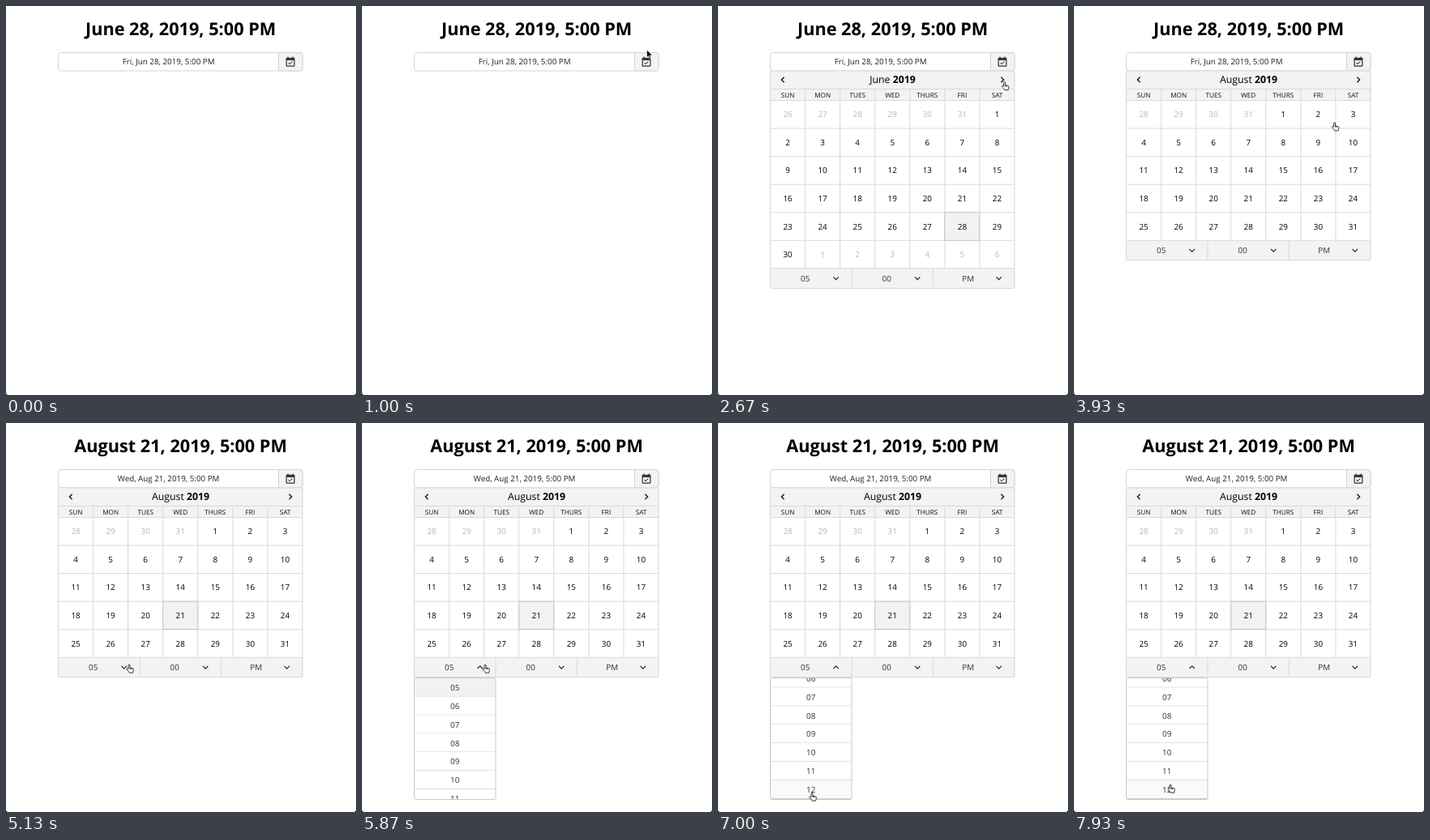
Write an HTML page that moves like this. It is 432 px wide and 480 px high and loops after 8000 ms.

```html
<!DOCTYPE html>
<html lang="en">
<head>
<meta charset="utf-8">
<title>Date picker</title>
<style>
html, body { margin: 0; width: 432px; height: 480px; overflow: hidden; background: #000; }
svg { display: block; background: #fff; border-radius: 0 0 3px 3px; font-family: "Open Sans", sans-serif; text-anchor: middle; text-rendering: geometricPrecision; }
.line { fill: none; stroke: #d9d9d9; }
.chevron { fill: none; stroke: #222; }
.option + text + .line { stroke: #c6c6c6; }
</style>
</head>
<body>
<svg id="stage" width="432" height="480" viewBox="0 0 432 480"></svg>
<script>
const LOOP = 8000, STEP = 1000 / 15;
const LEFT = 64.5, RIGHT = 366, WIDTH = RIGHT - LEFT, COL = WIDTH / 7, ROW = 34.55;
const TOP = 80, GRID_TOP = 116.5, FOOT = 24.5;
const OPTION = 22.9, LIST_TOP = 314.5, LIST_HEIGHT = 150, LIST_WIDTH = WIDTH / 3;

// Text centred on (x, y) by its cap height
const text = (x, y, content, size = 9.9, fill = '#000', extra = '') =>
  `<text x="${x}" y="${y + size * 0.357}" font-size="${size}" fill="${fill}" ${extra}>${content}</text>`;
const rect = (x, y, w, h, fill, extra = '') =>
  `<rect x="${x}" y="${y}" width="${w}" height="${h}" fill="${fill}" ${extra}/>`;
const line = d => `<path class="line" d="${d}"/>`;
const chevron = (x, y, angle, weight = 1.2) =>
  `<path class="chevron" d="M-3.2 -1.6L0 1.6L3.2 -1.6" stroke-width="${weight}" transform="translate(${x} ${y}) rotate(${angle})"/>`;

function calendar({ month, selected, open }) {
  const first = new Date(2019, month, 1);
  const offset = first.getDay();
  const days = new Date(2019, month + 1, 0).getDate();
  const rows = Math.ceil((offset + days) / 7);
  const foot = GRID_TOP + rows * ROW;
  const height = foot + FOOT - TOP;
  const name = first.toLocaleString('en', { month: 'long' });

  let out = rect(LEFT, TOP, WIDTH, height, '#f3f3f3') +
    rect(LEFT, GRID_TOP, WIDTH, rows * ROW, '#fff') +
    chevron(80, 91, 90, 1.5) + chevron(351, 91, -90, 1.5) +
    text(215.5, 91, `${name} <tspan font-weight="700">2019</tspan>`, 12.3) +
    line(`M${LEFT} 102.5H${RIGHT}`);

  ['SUN', 'MON', 'TUES', 'WED', 'THURS', 'FRI', 'SAT'].forEach((day, i) => {
    const x = LEFT + i * COL;
    out += text(x + COL / 2, 110, day, 8.2, '#111', 'font-weight="500"');
    if (i) out += line(`M${x} 102.5V${foot}`);
  });
  for (let r = 0; r <= rows; r++) out += line(`M${LEFT} ${GRID_TOP + r * ROW}h${WIDTH}`);

  for (let i = 0; i < rows * 7; i++) {
    const x = LEFT + i % 7 * COL, y = GRID_TOP + Math.floor(i / 7) * ROW;
    const day = i - offset + 1, inside = day > 0 && day <= days;
    if (inside && day === selected) out += rect(x, y, COL, ROW, '#f2f2f2', 'stroke="#c4c4c4"');
    out += text(x + COL / 2, y + ROW / 2, new Date(2019, month, day).getDate(), 9.9, inside ? '#000' : '#b8b8b8');
  }
  ['05', '00', 'PM'].forEach((label, i) => {
    const x = LEFT + i * LIST_WIDTH, y = foot + FOOT / 2;
    out += text(x + 43.2, y, label, 9.9, '#333') + chevron(x + 81.2, y, open && !i ? 180 : 0);
    if (i) out += line(`M${x} ${foot}v${FOOT}`);
  });
  return out + rect(LEFT, TOP, WIDTH, height, 'none', 'rx="2" stroke="#d5d5d5"');
}

const views = [
  { at: 1600, month: 5, selected: 28 },
  { at: 3070, month: 6 },
  { at: 3600, month: 7 },
  { at: 4670, month: 7, selected: 21 },
  { at: 5530, month: 7, selected: 21, open: true }
];
const PICKED = views[3].at, OPENED = views[4].at;
const hours = Array.from({ length: 8 }, (_, i) => String(i + 5).padStart(2, '0'));

const stage = document.getElementById('stage');
stage.innerHTML = `
  <clipPath id="listClip">${rect(LEFT, LIST_TOP, LIST_WIDTH, LIST_HEIGHT, '#fff')}</clipPath>
  ${text(215.6, 28.4, '', 21.7, '#000', 'id="heading" font-weight="700"')}
  ${rect(LEFT, 57.5, WIDTH, 22.5, '#fff', 'rx="3" stroke="#d5d5d5"')}
  <path d="M336.5 57.5H363a3 3 0 0 1 3 3V77a3 3 0 0 1-3 3H336.5Z" fill="#f3f3f5" stroke="#d5d5d5"/>
  <path fill="#333" transform="translate(343.7 62) scale(.61)" fill-rule="evenodd" d="M16.5 11L15.5 10L10.6 14.9L8.5 12.8L7.4 13.8L10.6 17ZM19 3H18V1H16V3H8V1H6V3H5a2 2 0 0 0-2 2V19a2 2 0 0 0 2 2H19a2 2 0 0 0 2-2V5a2 2 0 0 0-2-2ZM19 19H5V8H19Z"/>
  ${text(200.6, 68.8, '', 9.8, '#222', 'id="field"')}
  <g id="calendar">${views.map(v => `<g class="view">${calendar(v)}</g>`).join('')}</g>
  <g id="list">
    <g clip-path="url(#listClip)"><g id="options">
      ${hours.map((hour, i) => {
        const y = LIST_TOP + i * OPTION;
        return rect(LEFT, y, LIST_WIDTH, OPTION, '#fff', 'class="option"') +
          text(LEFT + LIST_WIDTH / 2, y + 11.8, hour, 9.9, '#333') +
          line(`M${LEFT} ${y + OPTION}h${LIST_WIDTH}`);
      }).join('')}
    </g></g>
    ${rect(LEFT, LIST_TOP, LIST_WIDTH, LIST_HEIGHT, 'none', 'rx="2" stroke="#c8c8c8"')}
  </g>
  <g id="cursor" stroke-linejoin="round">
    <path id="arrow" d="M0 0V9.6L2.2 7.6L3.7 11L5.3 10.3L3.8 7H7Z" fill="#000" stroke="#fff" stroke-width=".7"/>
    <path id="hand" transform="scale(.93)" d="M2.8 6.6V1.6a1 1 0 0 1 2 0V5l3.4.7a1.5 1.5 0 0 1 1.3 1.7c0 1.8-.6 2.4-.8 4.1H4.1C3.6 9.8 1.6 8.6.7 7.1C.1 6 1.4 5.3 2.1 6ZM5 5V7M6.7 5.4V7.2" fill="#fff" stroke="#111" stroke-width=".9"/>
  </g>`;

const part = id => document.getElementById(id);
const viewNodes = [...document.querySelectorAll('.view')];
const optionNodes = [...document.querySelectorAll('.option')];
const show = (node, on) => { node.style.display = on ? '' : 'none'; };
const clamp = v => Math.max(0, Math.min(1, v));
const ease = u => 1 - (1 - u) ** 3.5;

// Each move starts where the one before ended; bend bows it sideways
const moves = [
  { from: 135, to: 530, x: 300, y: 212.5, bend: -44 },
  { from: 735, to: 1000, x: 351.5, y: 54 },
  { from: 1135, to: 1400, x: 348.5, y: 63.5 },
  { from: 1870, to: 2400, x: 227, y: 93 },
  { from: 2400, to: 2670, x: 350, y: 93 },
  { from: 3867, to: 4400, x: 219.5, y: 228, bend: 18 },
  { from: 4800, to: 5130, x: 148.5, y: 297.5 },
  { from: 6065, to: 6267, x: 135, y: 341.5 },
  { from: 6600, to: 7200, x: 112, y: 458 },
  { from: 7200, to: 7930, x: 115.5, y: 445.5 }
];

function cursorAt(t) {
  let x = 333, y = 349;
  for (const move of moves) {
    const u = ease(clamp((t - move.from) / (move.to - move.from)));
    x += (move.x - x) * u + (move.bend || 0) * Math.sin(Math.PI * u);
    y += (move.y - y) * u;
  }
  return [x, y];
}

function render(t) {
  const picked = t >= PICKED;
  part('heading').textContent = `${picked ? 'August 21' : 'June 28'}, 2019, 5:00 PM`;
  part('field').textContent = `${picked ? 'Wed, Aug 21' : 'Fri, Jun 28'}, 2019, 5:00 PM`;

  const current = views.filter(v => t >= v.at).length - 1;
  viewNodes.forEach((node, i) => show(node, i === current));
  part('calendar').style.opacity = clamp((t - views[0].at + 40) / 200);

  const [x, y] = cursorAt(t);
  const scroll = (hours.length * OPTION - LIST_HEIGHT + 0.8) * ease(clamp((t - 6270) / 130));
  const hovered = Math.floor((y - LIST_TOP + scroll) / OPTION);
  show(part('list'), t >= OPENED);
  part('list').style.opacity = clamp((t - OPENED + 40) / 200);
  part('options').setAttribute('transform', `translate(0 ${-scroll})`);
  optionNodes.forEach((node, i) =>
    node.setAttribute('fill', i === 0 ? '#f2f2f2' : i === hovered ? '#fafafa' : '#fff'));

  const pointing = t >= 1350 && t < 1950 || t >= 2600;
  show(part('cursor'), t >= 200);
  show(part('hand'), pointing);
  show(part('arrow'), !pointing);
  part('cursor').setAttribute('transform', `translate(${x} ${y})`);
}

const start = performance.now();
function tick() {
  const t = (performance.now() - start) % LOOP;
  render(Math.floor((t + 5) / STEP) * STEP);
  requestAnimationFrame(tick);
}
tick();
</script>
</body>
</html>
```
